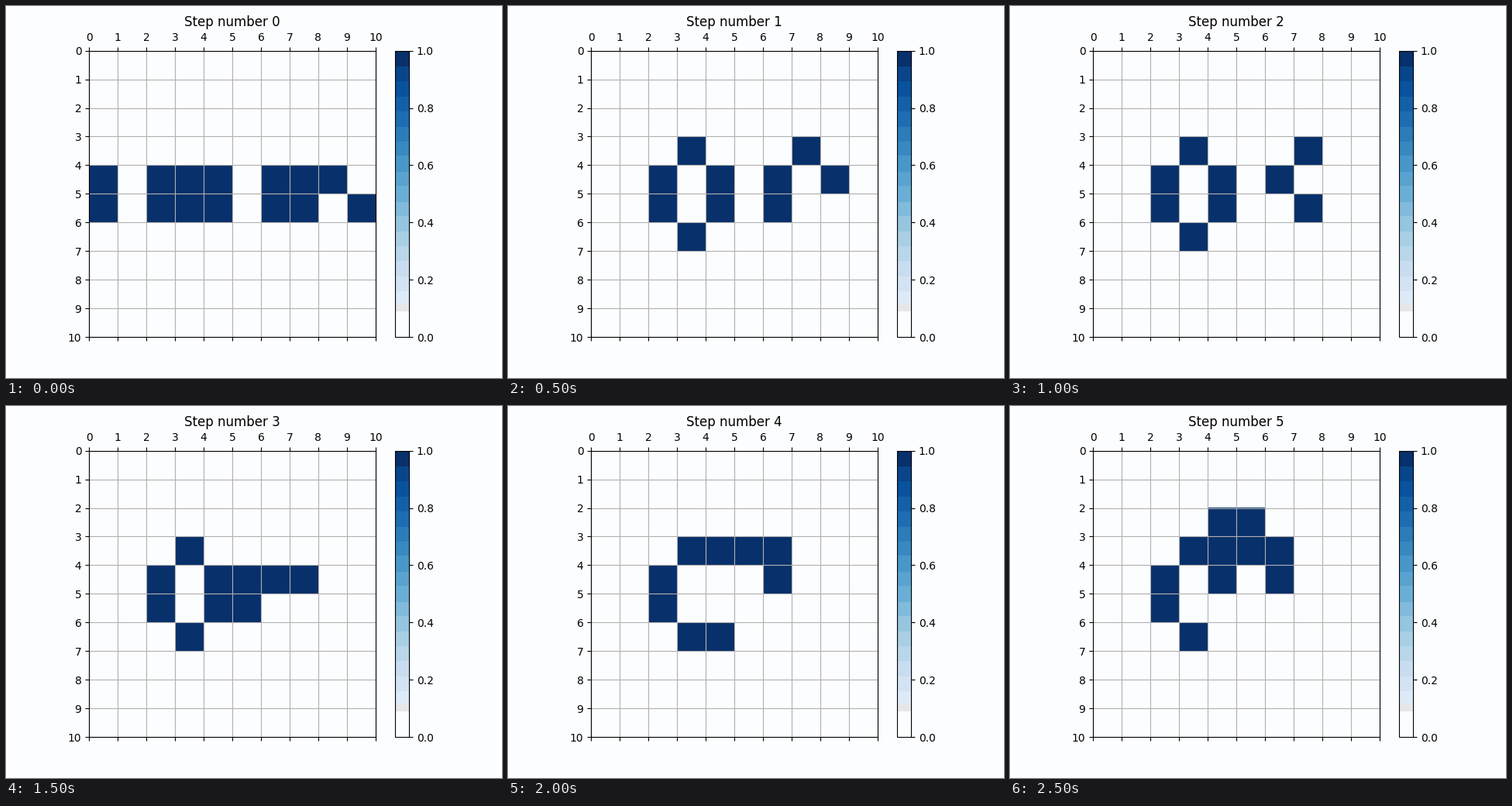
A matplotlib script that plays this animation: 640 px wide and 480 px high, repeating every 3 s.

```python
import numpy as np
import matplotlib.pyplot as plt
from matplotlib.animation import FuncAnimation
from matplotlib.colors import ListedColormap, to_rgba

SIZE = 10
STEPS = 6
BANDS = 19
PAPER = "#fcfdff"
GREY = "#e6e6ea"


def banded_blues():
    """Blues in equal flat bands, fading through grey to paper at the low end."""
    levels = np.linspace(0, 1, 256)
    band = np.minimum(np.floor(levels * BANDS), BANDS - 1)
    colors = plt.get_cmap("Blues")((band + 0.5) / BANDS)
    colors[levels < 0.117] = to_rgba(GREY)
    colors[levels < 0.09] = to_rgba(PAPER)
    colors[band == BANDS - 1] = plt.get_cmap("Blues")(1.0)
    return ListedColormap(colors)


def start():
    """Two rows with a gap in every fourth cell; the second swaps its last pair."""
    row = np.arange(SIZE) % 4 != 1
    grid = np.zeros((SIZE, SIZE), int)
    grid[4:6] = row
    grid[5, -2:] = row[-2:][::-1]
    return grid


def evolve(grid):
    """One Game of Life step; everything beyond the border is dead."""
    padded = np.pad(grid, 1)
    around = sum(padded[r:r + SIZE, c:c + SIZE]
                 for r in range(3) for c in range(3)) - grid
    return ((around == 3) | ((grid == 1) & (around == 2))).astype(int)


history = [start()]
while len(history) < STEPS:
    history.append(evolve(history[-1]))

plt.rcParams["font.family"] = "DejaVu Sans"
fig, ax = plt.subplots(figsize=(6.4, 4.8), dpi=100, facecolor=PAPER)
ax.set_facecolor(PAPER)
image = ax.matshow(history[0], cmap=banded_blues(), vmin=0, vmax=1,
                   extent=(0, SIZE, SIZE, 0))
ax.set_xticks(range(SIZE + 1))
ax.set_yticks(range(SIZE + 1))
ax.grid(True)
fig.colorbar(image)
title = ax.set_title("Step number 0")


def update(step):
    image.set_data(history[step])
    title.set_text(f"Step number {step}")
    return image, title


anim = FuncAnimation(fig, update, frames=STEPS, interval=500,
                     repeat=True, repeat_delay=0, blit=False)
plt.show()
```
